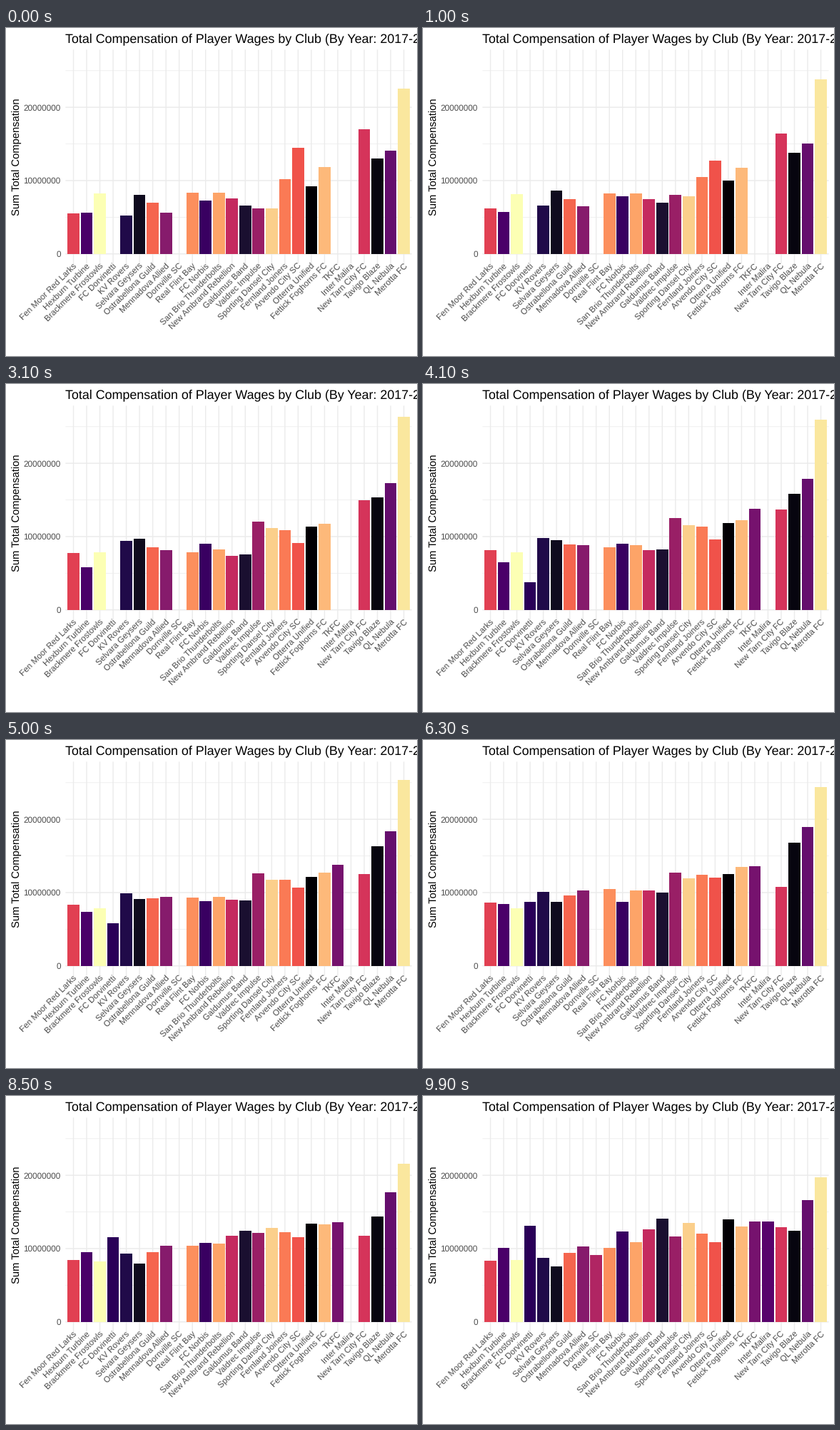
A matplotlib script for the animation above (10 s loop, 576x460 px).

```python
import numpy as np
import matplotlib.pyplot as plt
from matplotlib.animation import FuncAnimation
from matplotlib.patches import Rectangle

W, H, DPI = 576, 460, 64
LEFT, RIGHT, TOP, BOTTOM = 83.4, 568.67, 30.4, 330.4
ZERO, PER_MILLION = 316.8, 10.28
STEP = 33  # frames between two seasons
NA = np.nan

plt.rcParams["font.family"] = "Liberation Sans"
plt.rcParams["text.hinting"] = "none"

# club, colour, wages in millions for 2017, 2018, 2019, 2020
CLUBS = [
    ("Fen Moor Red Larks", "#e14052", 5.48, 7.93, 8.66, 8.30),
    ("Hexburn Turbine", "#4a0069", 5.67, 5.84, 8.75, 10.05),
    ("Brackmere Frostowls", "#fcffb4", 8.25, 7.86, 7.83, 8.49),
    ("FC Dorvinetti", "#2a0058", NA, 2.00, 9.37, 13.16),
    ("KV Rovers", "#200a49", 5.26, 9.69, 10.09, 8.69),
    ("Selvara Geysers", "#0f0b1e", 8.10, 9.77, 8.58, 7.57),
    ("Ostrabellona Guild", "#f5654e", 7.03, 8.64, 9.71, 9.37),
    ("Mennadova Allied", "#861b6c", 5.67, 8.31, 10.53, 10.34),
    ("Dornville SC", "#b02563", NA, NA, NA, 9.17),
    ("Real Flint Bay", "#fc8f5d", 8.39, 7.83, 10.80, 10.05),
    ("FC Norbis", "#390061", 7.32, 9.12, 8.65, 12.38),
    ("San Brio Thunderbolts", "#fda468", 8.30, 8.28, 10.44, 10.92),
    ("New Ambrand Rebellion", "#c42a5f", 7.52, 7.39, 10.63, 12.58),
    ("Galdumus Band", "#1a0f30", 6.64, 7.62, 10.19, 14.04),
    ("Valdrec Impulse", "#991f66", 6.16, 12.47, 12.80, 11.70),
    ("Sporting Dansel City", "#fbcf8b", 6.25, 11.48, 11.94, 13.55),
    ("Fernland Joiners", "#fa7a55", 10.24, 10.96, 12.53, 12.09),
    ("Arvendo City SC", "#f0524a", 14.43, 8.77, 12.42, 10.92),
    ("Otterra Unified", "#020004", 9.27, 11.54, 12.68, 13.94),
    ("Fettick Foghorns FC", "#fdb97a", 11.80, 11.76, 13.63, 13.06),
    ("TKFC", "#76126e", NA, 13.91, 13.60, 13.65),
    ("Inter Malira", "#58036c", NA, NA, NA, 13.74),
    ("New Tarn City FC", "#d5345a", 17.05, 14.83, 10.32, 12.87),
    ("Tavigo Blaze", "#07050f", 13.06, 15.53, 16.99, 12.48),
    ("QL Nebula", "#650e6d", 14.04, 17.54, 19.14, 16.66),
    ("Merotta FC", "#fae79e", 22.59, 26.56, 24.18, 19.71),
]
WAGES = np.array([club[2:] for club in CLUBS])
SLOT = (RIGHT - LEFT) / (len(CLUBS) + 0.2)
BAR = 0.9 * SLOT


def pt(px):
    return px * 72 / DPI


def y_at(millions):
    return ZERO - millions * PER_MILLION


def grid(xs, ys, width):
    ax.plot(xs, ys, color="#ebebeb", lw=pt(width), zorder=1,
            solid_capstyle="butt", snap=False)


def label(x, y, text, size, color="#4d4d4d", **kw):
    ax.text(x, y, text, fontsize=pt(size), color=color, va="baseline",
            rotation_mode="anchor", **kw)


fig = plt.figure(figsize=(W / DPI, H / DPI), dpi=DPI, facecolor="white")
ax = fig.add_axes([0, 0, 1, 1])
ax.set_xlim(0, W)
ax.set_ylim(H, 0)
ax.axis("off")

for m in range(0, 30, 5):
    if m <= 25:
        grid([LEFT, RIGHT], [y_at(m)] * 2, 0.71 if m % 10 else 1.42)
    if m % 10 == 0:
        label(76.8, y_at(m) + 4.2, str(m * 10**6), 11.73, ha="right")

label(LEFT - 0.2, 19.9, "Total Compensation of Player Wages by Club "
      "(By Year: 2017-2020)", 17.9, "black")
label(18.6, (TOP + BOTTOM) / 2, "Sum Total Compensation", 14.8, "black",
      ha="center", rotation=90)

bars = []
for i, (name, color, *_) in enumerate(CLUBS):
    x = LEFT + (0.6 + i) * SLOT
    grid([x, x], [TOP, BOTTOM], 1.42)
    label(x + 5.4, 334.2, name, 11.73, ha="right", rotation=45)
    # bars have hard pixel edges
    bar = Rectangle((x - BAR / 2, ZERO), BAR, 0, fc=color, lw=0,
                    snap=True, antialiased=False, zorder=2)
    bars.append(ax.add_patch(bar))


def update(frame):
    season, step = divmod(frame, STEP)
    now = WAGES[:, season]
    if step:
        now = now + (WAGES[:, season + 1] - now) * step / STEP
    for bar, value in zip(bars, now):
        bar.set_visible(not np.isnan(value))
        bar.set_height(-np.nan_to_num(value) * PER_MILLION)
    return bars


anim = FuncAnimation(fig, update, frames=3 * STEP + 1, interval=100,
                     repeat=True, repeat_delay=0, blit=False)
plt.show()
```
